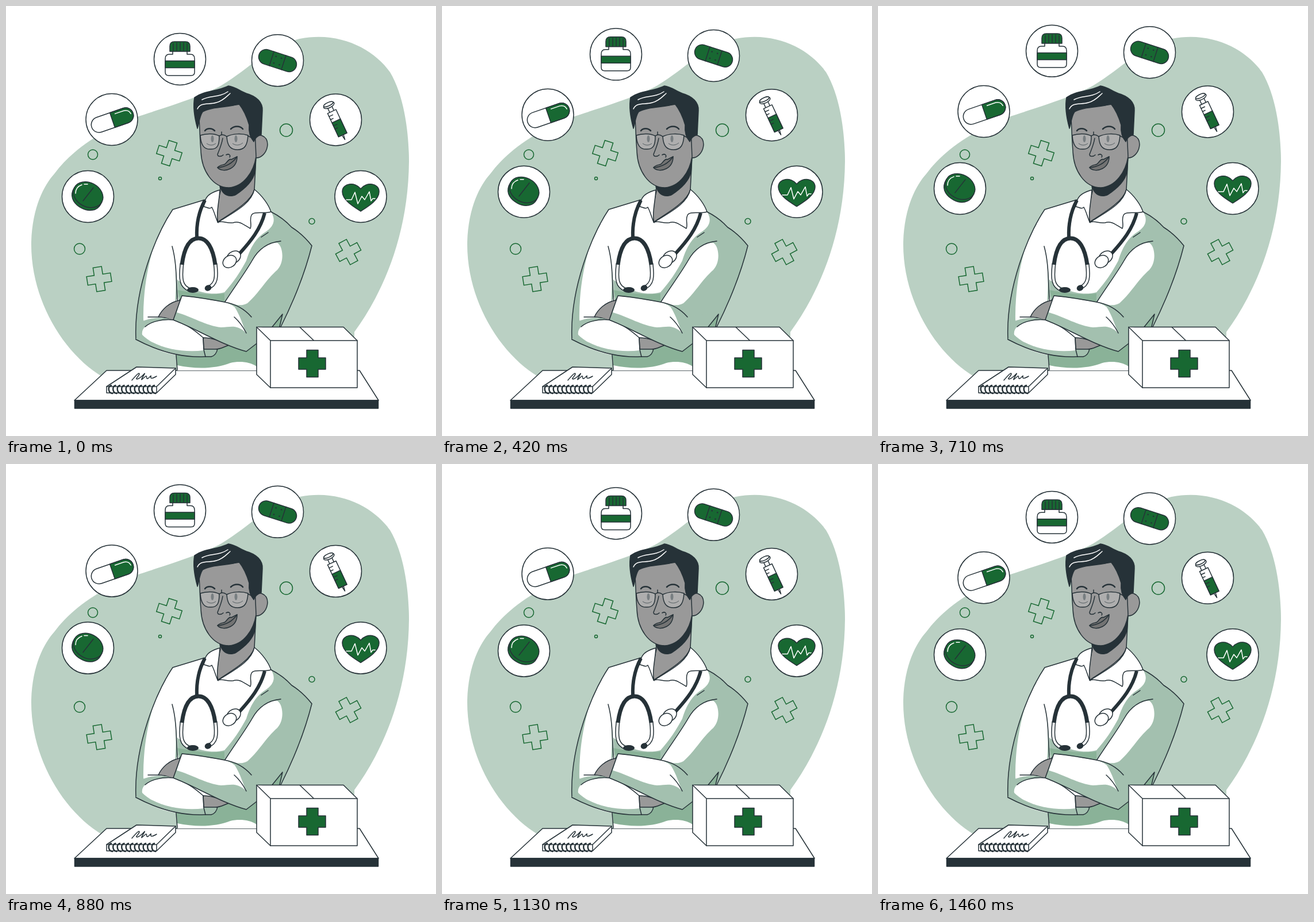
These frames come from a looping animation (748x748 px, 1500 ms). An HTML page:

```html
<!DOCTYPE html>
<html lang="en">
<head>
<meta charset="utf-8">
<title>Pharmacist</title>
<style>
html, body { margin: 0; width: 100%; height: 100%; overflow: hidden; background: #fff; }
svg { display: block; width: 100vw; height: 100vh; }
.line { stroke: #263238; stroke-width: 1.5; stroke-linecap: round; stroke-linejoin: round; }
.bold { stroke-width: 2.5; }
.none { fill: none; }
.white { fill: #fff; }
.green { fill: #186832; }
.dark { fill: #263238; }
.skin { fill: #999; }
.shade { fill: #a3c0af; }
.deep { fill: #8ab298; }
.shine { fill: none; stroke: #fff; stroke-width: 1.5; stroke-linecap: round; stroke-linejoin: round; }
.deco { fill: none; stroke: #186832; stroke-width: 1.5; }
</style>
</head>
<body>
<svg viewBox="0 0 748 748">
<defs>
  <path id="cross" d="M-7.500-21h15v13.500h13.500v15H7.500V21h-15V7.500H-21v-15h13.500z"/>
  <path id="coat" d="M346 337L290 354C262 396 222 490 226 580C250 593 272 603 296 607L298 634H440L436 590C455 580 470 568 481 553C502 510 520 465 532 417C521 403 510 393 497 385C487 374 475 365 461 358L432 320L371 320Z"/>
  <clipPath id="inCoat"><use href="#coat"/></clipPath>
</defs>

<path fill="#bad0c3" d="M168 645C100 605 42 510 44 410C46 350 66 312 84 292C122 240 190 205 240 189C300 169 345 155 375 138C425 108 455 70 511 57C580 43 640 75 668 115C695 160 701 230 701 270C700 400 655 500 606 567V645Z"/>

<g class="deco">
  <use href="#cross" transform="translate(284 256) rotate(18)"/>
  <use href="#cross" transform="translate(162 475) rotate(-9)"/>
  <use href="#cross" transform="translate(595.500 428) rotate(-28)"/>
  <circle cx="151" cy="258.500" r="8.500"/>
  <circle cx="268" cy="300" r="2.500"/>
  <circle cx="487.500" cy="216" r="11"/>
  <circle cx="532" cy="374.500" r="5"/>
  <circle cx="128" cy="422.500" r="9.500"/>
</g>

<!-- desk -->
<path class="white line" d="M175 634H615L648 686H119Z"/>
<path class="dark line" d="M119.500 686H647.500V700H119.500Z"/>

<!-- coat -->
<use href="#coat" class="white"/>
<g clip-path="url(#inCoat)">
  <path class="shade" d="M461 358C470 372 466 384 450 394C432 406 424 424 418 443C408 462 396 480 380 498C350 506 318 492 298 476L300 520L420 605L480 560L540 417L497 380Z"/>
  <path class="deep" d="M298 494C325 499 350 504 380 500V520L305 515Z"/>
  <path class="shade" d="M268 388C250 430 238 490 239 545L246 600L215 590V480Z"/>
  <path class="shade" d="M292 430C296 448 296 470 300 505L294 515C297 480 295 450 292 430Z"/>
  <path class="deep" d="M296 600L436 585V627C424 619 406 617 390 621C365 631 330 632 298 625Z"/>
</g>
<path class="white" d="M380 516C398 488 416 464 428 443C440 421 457 411 472 412C482 418 485 445 472 459C462 468 455 476 446 488C438 498 430 508 420 517C408 524 395 518 380 516Z"/>
<g class="line none">
  <path d="M346 337L290 354C262 396 222 490 226 580M296 607L298 633M461 358C475 365 487 374 497 385C510 393 521 403 532 417C520 465 502 510 478 558"/>
  <path d="M289 418C297 447 296 475 298 512M380 516C398 488 416 464 428 443C440 421 457 411 478 409M444 402L456 394M247 541H267"/>
</g>

<!-- folded arms -->
<path class="skin line" d="M265 541C271 528 284 515 302 512L306 506L291 547C281 543 272 541 265 541Z"/>
<path class="shade" d="M226 580C260 598 300 612 345 610H357C364 608 367 602 368 596L343 577C325 561 307 550 291 546C273 540 254 542 238 548Z"/>
<path class="white" d="M237 572C234 555 258 546 291 546C308 550 328 562 343 577L344 599C305 604 258 594 237 572Z"/>
<path class="line none" d="M226 580C260 598 300 612 345 610H357C364 608 367 602 368 596M343 577C325 561 307 550 291 546C272 544 252 549 242 558"/>
<path class="skin line" d="M343 577C360 577 376 584 388 590C378 593 372 598 362 597H344Z"/>
<path class="line none" d="M343 577L344 598L347 610"/>
<path class="shade" d="M306 504L291 546C330 561 376 590 418 601L440 584L474 560L485 530L427 541C414 526 398 518 380 515C354 510 330 506 306 504Z"/>
<path class="deep line" d="M481 536L475 562H460Z"/>
<path class="white" d="M306 504L297 533C322 540 350 557 374 559C394 558 402 554 418 569C412 556 408 540 398 524C392 519 386 517 380 515Z"/>
<path class="line none" d="M427 541C414 526 398 518 380 515C354 510 330 506 306 504L291 546C330 561 376 590 418 601L440 584M418 569C412 557 406 549 397 541"/>

<!-- neck and collar -->
<path class="skin line" d="M371 300L373 322C369 340 364 358 368 376C392 360 425 342 432 320L435 262Z"/>
<path class="dark" d="M371 311C374 328 387 335 400 329C418 317 431 304 434 288L436 255L420 290Z"/>
<path class="white line" d="M372 320C361 323 350 328 347 337L344 349C350 350 354 354 358 350C363 359 365 370 369 377C365 361 371 340 372 320Z"/>
<path class="white line" d="M432 319C446 330 457 346 461 358C448 362 431 356 427 364C423 372 428 380 425 387C414 381 406 373 395 377C385 379 378 373 369 376C396 359 427 344 432 319Z"/>

<!-- head -->
<path class="skin line" d="M432 230C438 220 455 225 455 241C454 256 443 266 432 264Z"/>
<path class="skin line" d="M335 180C337 205 337 230 339 252C340 287 360 316 388 316C414 314 431 288 435 262L433 215L415 170Z"/>
<path class="dark line" d="M333 213C328 195 325 175 328 159C345 147 367 149 387 139C398 140 407 148 418 152C436 157 447 168 446 182L444 224C437 226 433 230 431 236C424 228 422 218 423 207C419 193 413 180 405 170C390 177 360 174 342 184C336 193 336 205 333 213Z"/>
<path class="shine" d="M333 179C338 167 352 172 366 168C378 165 384 157 390 152M341 163C354 155 370 160 386 149"/>
<g class="line none">
  <path class="bold" d="M346 217C350 212 358 212 363 217M391 214C397 208 407 208 412 214"/>
  <path d="M377 230C375 242 371 250 368 258C368 263 375 262 378 259M383 259C388 256 391 260 389 263"/>
</g>
<ellipse cx="359" cy="231" rx="2.500" ry="6" fill="#555e62"/>
<ellipse cx="400" cy="231" rx="2.500" ry="6" fill="#555e62"/>
<g class="line" fill="#fff" fill-opacity=".2">
  <path d="M338 225C350 221 363 222 371 226C371 240 369 249 357 249C345 250 339 243 338 225ZM384 227C394 222 410 221 421 225C420 241 416 250 403 250C390 250 385 243 384 227Z"/>
  <path class="none" d="M371 226C375 223 380 224 384 227M421 226L431 231M375 219V224"/>
</g>
<path d="M349 239C354 243 360 243 365 239M394 239C399 243 406 243 412 238" class="none" stroke="#555e62"/>
<path class="line" fill="#737373" d="M368 281C372 276 377 277 381 275C385 271 388 265 392 267L402 262C402 271 398 279 390 283C380 288 371 285 368 281Z"/>
<path class="line none" d="M368 281C382 280 393 275 402 262"/>

<!-- stethoscope -->
<g fill="none" stroke="#263238">
  <path stroke-width="6" d="M346 338C335 358 331 380 332 403M450 360C443 388 426 409 405 432"/>
  <path stroke-width="7" d="M306 448C303 475 304 488 320 494M364 448C367 472 366 484 352 490"/>
  <path stroke="#fff" stroke-width="4" d="M306 448C303 475 304 488 320 494M364 448C367 472 366 484 352 490"/>
  <path stroke-width="7" d="M306 450C310 420 320 404 335 404C350 404 360 421 364 450"/>
</g>
<ellipse class="dark" cx="325" cy="494" rx="10" ry="5"/>
<ellipse class="dark" cx="351.500" cy="490.500" rx="6" ry="5" transform="rotate(-25 351.500 490.500)"/>
<g class="white line">
  <ellipse cx="396" cy="437" rx="13" ry="10" transform="rotate(-35 396 437)"/>
  <ellipse cx="389" cy="444.500" rx="12.500" ry="10" transform="rotate(-35 389 444.500)"/>
</g>

<!-- first aid box -->
<g class="white line">
  <path d="M436 558.500H587L611 582V664H460L436 641Z"/>
  <path d="M436 558.500L460 582H611M460 582V664M511 558.500L535 581.500"/>
  <path class="green" d="M523 598.500H543V612H556V632H543V645.500H523V632H509V612H523Z"/>
</g>

<!-- notebook -->
<g class="white line">
  <path d="M175 662L227 628L295 630V641L262 673H175Z"/>
  <path d="M175 662H262L295 630M262 662V673"/>
  <path class="none" d="M219 651C224 645 232 636 232 640C231 645 224 648 228 649C235 648 243 636 241 640C238 645 235 650 236 650L243 644C246 642 243 650 247 648C251 645 253 641 252 645C251 649 255 648 262 644"/>
  <path id="rings" class="none bold"/>
</g>

<!-- floating badges -->
<g id="badges">
  <g class="white line">
    <circle cx="302.500" cy="92.400" r="45"/>
    <circle cx="472.500" cy="94.800" r="45"/>
    <circle cx="184" cy="197.500" r="45"/>
    <circle cx="573.500" cy="198" r="45"/>
    <circle cx="142.500" cy="331.500" r="45"/>
    <circle cx="617" cy="331.500" r="45"/>
  </g>
  <g class="line white">
    <path d="M290 78H315V84H321Q328 84 328 92V115Q328 121 322 121H283Q277 121 277 115V92Q277 84 284 84H290Z"/>
    <path class="green" d="M277 95.500H328V107.500H277ZM285 79V70Q285 62 293 62H312Q320 62 320 70V79Z"/>
    <path d="M291 65V78M297 64V78M303 64V78M309 64V78M315 65V78"/>
  </g>
  <g class="line green" transform="translate(472.500 95) rotate(18)">
    <rect x="-34" y="-13" width="68" height="26" rx="13"/>
    <path d="M-11-13V13M11-13V13"/>
    <path class="bold" d="M-5-6h.1M5-6h.1M-5 6h.1M5 6h.1"/>
  </g>
  <g class="line" transform="translate(185 198.500) rotate(-19)">
    <rect class="white" x="-38" y="-13.500" width="76" height="27" rx="13.500"/>
    <path class="green" d="M0-13.500H24.500A13.500 13.500 0 0 1 24.500 13.500H0Z"/>
    <path class="shine" d="M8-9H24Q33-8 34 0"/>
  </g>
  <g class="line white" transform="translate(573.500 198) rotate(-25)">
    <path d="M-4-27V-13H4V-27ZM-1.500 29H1.500L0 38Z"/>
    <ellipse cx="0" cy="-28" rx="10" ry="4.500"/>
    <ellipse cx="0" cy="-30" rx="9" ry="3"/>
    <path d="M-8-16H8V29H-8Z"/>
    <path class="green" d="M-8 2H8V29H-8Z"/>
    <path d="M-8-10h7M-8-4h5M-8 8h7M-8 14h5"/>
  </g>
  <g class="line green" transform="translate(142 330)">
    <g transform="rotate(28)">
      <path d="M-27-2V4C-25 19-12 24 1 24C16 24 27 15 27 3V-2Z"/>
      <ellipse cx="0" cy="-2" rx="27" ry="21"/>
    </g>
    <path d="M10-14L-8 9"/>
    <path class="shine" d="M-21-4C-21-12-16-17-10-19M-6-20L0-20"/>
  </g>
  <path class="line green" d="M617 357C606 350 585 338 585 323C585 308 607 305 617 318C627 305 649 308 649 323C649 338 628 350 617 357Z"/>
  <path class="shine" d="M592 337H601L607 324L612 344L619 331L624 337L632 323L635 339L638 335H642"/>
</g>
</svg>
<script>
const badges = document.getElementById('badges');
const STEPS = 36, HALF = STEPS / 2, SPEED = 0.83, PHASE = 0.6;

document.getElementById('rings').setAttribute('d', Array.from({ length: 11 },
  (_, i) => `M${183 + i * 7.5} 660c-6 1-6 13 2 14`).join(''));

// The badges bob at constant speed, 24 positions a second.
function draw() {
  const tick = Math.floor(performance.now() % 1500 / 10);
  const step = Math.floor((tick + 0.49) * STEPS / 150);
  const phase = (step + PHASE) % STEPS;
  const rise = (HALF - Math.abs(phase - HALF) - PHASE) * SPEED;
  badges.setAttribute('transform', `translate(0 ${-rise})`);
  requestAnimationFrame(draw);
}
draw();
</script>
</body>
</html>
```
